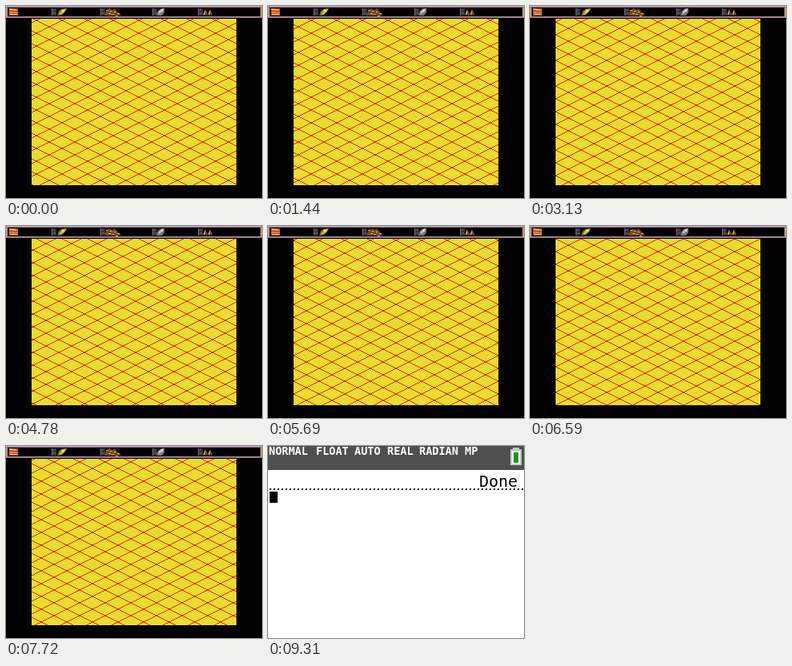
Write an HTML page with a canvas that moves like this. It is 320 px wide and 240 px high and loops after 9.47 s.

```html
<!DOCTYPE html>
<html lang="en">
<head>
<meta charset="utf-8">
<title>Isometric field</title>
<style>
html, body { margin: 0; width: 100%; height: 100%; overflow: hidden; background: #000; }
canvas { display: block; width: 320px; height: 240px; image-rendering: pixelated; }
</style>
</head>
<body>
<canvas id="stage" width="320" height="240"></canvas>
<script>
const ctx = document.getElementById("stage").getContext("2d");
const LOOP = 9470, STEP = 31.3;
const FIELD = { x: 32, y: 16, w: 256, h: 208 };

// Scrolling spans: start, end, pixels per step in x and y
const moves = [
  [1090, 2045, 0, 2],
  [2045, 3340, 2, 0],
  [4030, 4250, 0, -2],
  [4530, 5485, 0, -2],
  [5485, 6455, -2, 0],
  [6455, 7425, 0, 2],
  [7425, 8160, 2, 0]
];

function rect(color, x, y, w, h) {
  ctx.fillStyle = color;
  ctx.fillRect(x, y, w, h);
}

function poly(color, ...points) {
  ctx.fillStyle = color;
  ctx.beginPath();
  for (let i = 0; i < points.length; i += 2) ctx.lineTo(points[i], points[i + 1]);
  ctx.fill();
}

function label(text, x, y, font, color) {
  ctx.font = font;
  ctx.fillStyle = color;
  ctx.fillText(text, x, y);
}

function scrollAt(t) {
  let x = 10, y = 6;
  for (const [start, end, dx, dy] of moves) {
    if (t < start) break;
    const n = Math.floor((Math.min(t, end) - start) / STEP) + 1;
    x += n * dx;
    y += n * dy;
  }
  return [x, y];
}

const mod = (a, n) => ((a % n) + n) % n;

function drawField(t) {
  const [ox, oy] = scrollAt(t);
  const { x, y, w, h } = FIELD;
  rect("#e8dc30", x, y, w, h);
  ctx.fillStyle = "#e02808";
  for (let px = 0; px < w; px++) {
    const rise = Math.floor((px + ox) / 2);
    for (const slope of [rise, -rise - 1]) {
      for (let py = mod(slope - oy, 16); py < h; py += 16) ctx.fillRect(x + px, y + py, 1, 1);
    }
  }
}

function slot(x) {
  rect("#353238", x, 3, 6, 9);
  rect("#817482", x, 3, 1, 9);
  rect("#55505a", x + 2, 4, 2, 2);
  rect("#55505a", x + 2, 8, 3, 2);
}

function drawBar() {
  rect("#8b6c86", 0, 0, 320, 15);
  rect("#c9abc0", 0, 0, 320, 1);
  rect("#b792a9", 0, 13, 320, 1);
  rect("#000", 2, 2, 316, 11);
  rect("#c19872", 0, 2, 2, 11);
  rect("#c19872", 318, 2, 2, 11);

  // Planks
  rect("#b5512b", 4, 3, 11, 9);
  poly("#f0b06c", 4, 3, 12, 4, 15, 6, 4, 5);
  poly("#e58a4c", 4, 7, 15, 8, 15, 9, 4, 9);
  rect("#f5c486", 5, 10, 9, 1);

  // Grain
  slot(57);
  poly("#61701e", 64, 12, 66, 6, 70, 4, 72, 9, 67, 12);
  poly("#d8b52c", 66, 10, 70, 4, 76, 3, 73, 8, 69, 11);
  rect("#f4dd65", 70, 5, 3, 2);

  // Gold
  slot(118);
  poly("#76491b", 123, 12, 125, 6, 129, 3, 133, 5, 136, 3, 140, 8, 144, 12);
  for (let i = 0; i < 13; i++)
    rect(i % 3 ? "#c9974a" : "#efcf86", 125 + i * 7 % 16, 5 + i * 5 % 7 + (i * 7 % 16 > 11 ? 1 : 0), 2, 1);

  // Stone
  slot(183);
  poly("#777", 188, 12, 190, 6, 194, 3, 198, 3, 198, 8, 195, 12);
  poly("#bdbdbd", 190, 8, 194, 4, 198, 3, 195, 7, 192, 10);
  rect("#e5e5e5", 194, 5, 2, 2);

  // Huts
  slot(240);
  for (const x of [246, 252]) {
    poly("#8d6038", x, 11, x + 3, 4, x + 6, 11);
    poly("#d0a36d", x + 1, 10, x + 3, 5, x + 3, 11);
    rect("#40291a", x + 3, 9, 1, 2);
  }
}

function drawGame(t) {
  rect("#000", 0, 0, 320, 240);
  drawField(t);
  drawBar();
}

function drawStatus() {
  rect("#505050", 0, 0, 320, 30);
  const words = [["NORMAL", 1], ["FLOAT", 60], ["AUTO", 108], ["REAL", 149], ["RADIAN", 189], ["MP", 246]];
  for (const [word, x] of words)
    label(word, x, 11, 'bold 13.5px "DejaVu Sans Mono", monospace', "#fff");
  rect("#c8c8c8", 306, 2, 8, 3);
  rect("#c8c8c8", 303, 4, 14, 20);
  rect("#fff", 305, 6, 10, 16);
  rect("#129a12", 307, 8, 6, 13);
}

function drawHome(t) {
  rect("#fff", 0, 0, 320, 240);
  if (t >= 8500) drawStatus();
  if (t >= 8560) {
    label("Done", 264, 51, '20px "DejaVu Sans Mono", monospace', "#000");
    for (let x = 2; x < 318; x += 5) rect("#000", x, 53, 2, 2);
  }
  const hidden = (t >= 8810 && t < 8970) || (t >= 9130 && t < 9310);
  if (t >= 8660 && !hidden) rect("#000", 2, 57, 10, 14);
}

function frame(now) {
  const t = now % LOOP;
  if (t < 8440) drawGame(t);
  else drawHome(t);
  requestAnimationFrame(frame);
}
requestAnimationFrame(frame);
</script>
</body>
</html>
```
